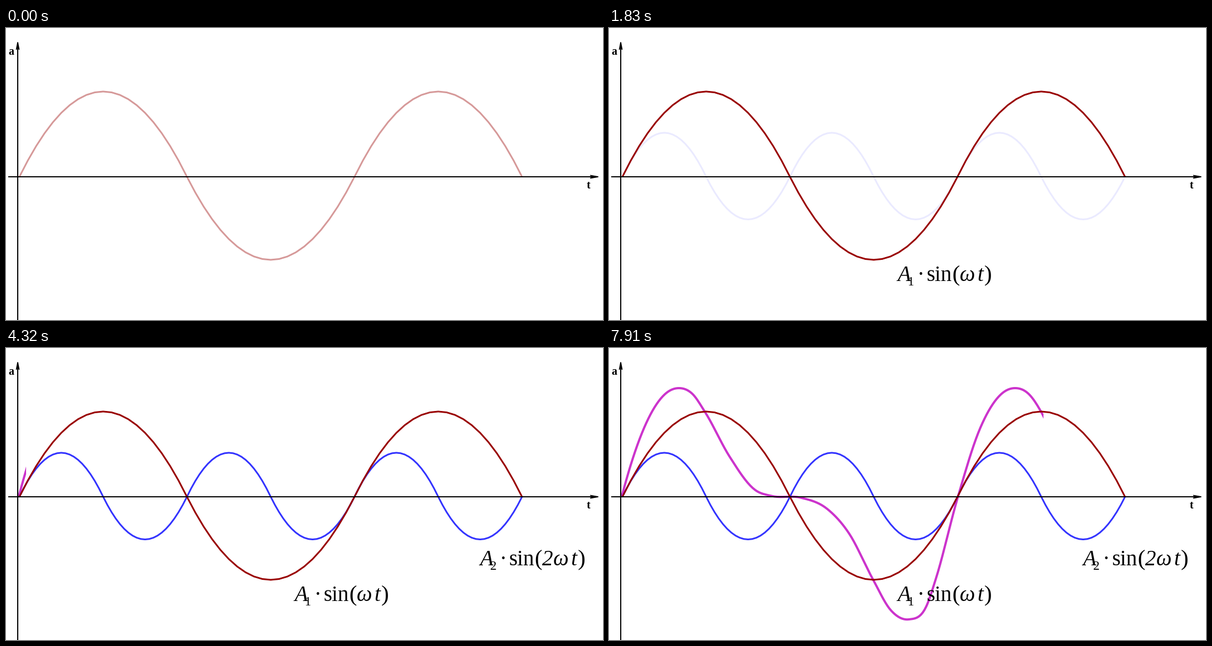
A matplotlib script for the animation above (7990 ms loop, 1069 px wide and 524 px high).

```python
import numpy as np
import matplotlib.pyplot as plt
from matplotlib.animation import FuncAnimation
from matplotlib.transforms import Bbox, TransformedBbox

W, H, DPI = 1069, 524, 64
LOOP, STEP = 7990, 34
TICK = 81.75           # ms per step of a fade or wipe
PX = 72 / DPI          # points per pixel
LEFT, MID = 24, 267    # where the waves begin

RED, BLUE, MAGENTA = "#990000", "#3333ff", "#cc33cc"

plt.rcParams["font.family"] = "Liberation Serif"
plt.rcParams["toolbar"] = "None"
fig = plt.figure(figsize=(W / DPI, H / DPI), dpi=DPI, facecolor="white")
ax = fig.add_axes([0, 0, 1, 1])
ax.set_xlim(0, W)
ax.set_ylim(H, 0)
ax.axis("off")


def stroke(x, y, color, width, z):
    line, = ax.plot(x, y, color=color, lw=width * PX, zorder=z,
                    solid_capstyle="butt", solid_joinstyle="round")
    return line


def write(x, y, s, size, **style):
    return ax.text(x, y, s, fontsize=size * PX, color="black", ha="left",
                   va="baseline", zorder=6, **style)


def wave(quarter, high, low, count, n=10):
    """Parabolic arches: zero, crest, zero, trough, one every quarter."""
    k = np.linspace(0, count, count * n + 1)
    phase = k % 4
    up = phase < 2
    shape = 1 - (phase % 2 - 1) ** 2
    return LEFT + quarter * k, MID + shape * np.where(up, high - MID, low - MID)


def smooth(points, n=10):
    """Cubic Hermite curve through points, with averaged slopes."""
    x, y = np.array(points, float).T
    m = np.gradient(y, x, edge_order=2)
    t = np.linspace(0, 1, n, endpoint=False)
    xs, ys = [], []
    for i, d in enumerate(np.diff(x)):
        xs.extend(x[i] + d * t)
        ys.extend((1 + 2 * t) * (1 - t) ** 2 * y[i]
                  + t * (1 - t) ** 2 * d * m[i]
                  + t * t * (3 - 2 * t) * y[i + 1]
                  + t * t * (t - 1) * d * m[i + 1])
    return xs, ys


def formula(x, y, index, factor=""):
    """Spell A_n . sin(factor omega t)."""
    shift = 20 * len(factor)
    return [write(x, y, "A", 39, style="italic"),
            write(x + 19, y + 8, index, 23),
            write(x + 35.5, y, "·", 39),
            write(x + 52.5, y, "sin", 39),
            write(x + 98.5, y, "(", 41),
            write(x + 112, y, factor, 39, style="italic"),
            write(x + 112 + shift, y, "ω", 39, style="italic"),
            write(x + 143.5 + shift, y, "t", 39, style="italic"),
            write(x + 156 + shift, y, ")", 41)]


# Axes with open arrowheads
stroke([21, 21], [26, H], "black", 2, 5)
stroke([4, 1060], [MID, MID], "black", 2, 5)
stroke([18.5, 21, 23.5], [39, 26, 39], "black", 1.8, 5)
stroke([1046, 1060, 1046], [MID - 2.5, MID, MID + 2.5], "black", 1.8, 5)
write(4, 47.5, "a", 20, weight="bold")
write(1039.5, 288, "t", 20, weight="bold")

red = stroke(*wave(150, 114, 416, 6), RED, 3, 4)
blue = stroke(*wave(75, 188, 343.5, 12), BLUE, 3, 3)

# One period of the summed curve, then its first hump again
rise = [(22.5, 268), (63, 143), (100, 83), (125, 72), (149, 82), (172, 115)]
fall = [(216, 195), (262, 255), (291, 265.5), (343, 268.5), (391, 289),
        (430, 333), (472, 414), (505, 471), (537, 487), (568, 464),
        (585, 415)]
again = [(x + 602, y) for x, y in rise]
total = stroke(*smooth(rise + fall + again + [(790, 148)]), MAGENTA, 4, 2)

label1 = formula(516, 454, "1")
label2 = formula(848, 390, "2", "2")


def ticks(t, start):
    """Number of steps begun by time t."""
    return max(0, int(np.floor((t - start) / TICK + 0.25)) + 1)


def draw(i):
    t = (i + 0.5) * STEP
    red.set_alpha(min(1, 0.4 + 0.1 * ticks(t, 80)))
    blue.set_alpha(min(1, 0.1 * ticks(t, 1830)))
    for part in label1:
        part.set_visible(t >= 750)
    for part in label2:
        part.set_visible(t >= 2800)
    n = ticks(t, 4320)
    total.set_visible(n > 0)
    edge = np.interp(n, [0, 30, 40, 45], [19, 514, 695, 778])
    box = Bbox.from_extents(0, 0, edge / W, 1)
    total.set_clip_box(TransformedBbox(box, fig.transFigure))
    return []


anim = FuncAnimation(fig, draw, frames=LOOP // STEP, interval=STEP,
                     init_func=lambda: draw(0), repeat=True, repeat_delay=0,
                     blit=False)
plt.show()
```
